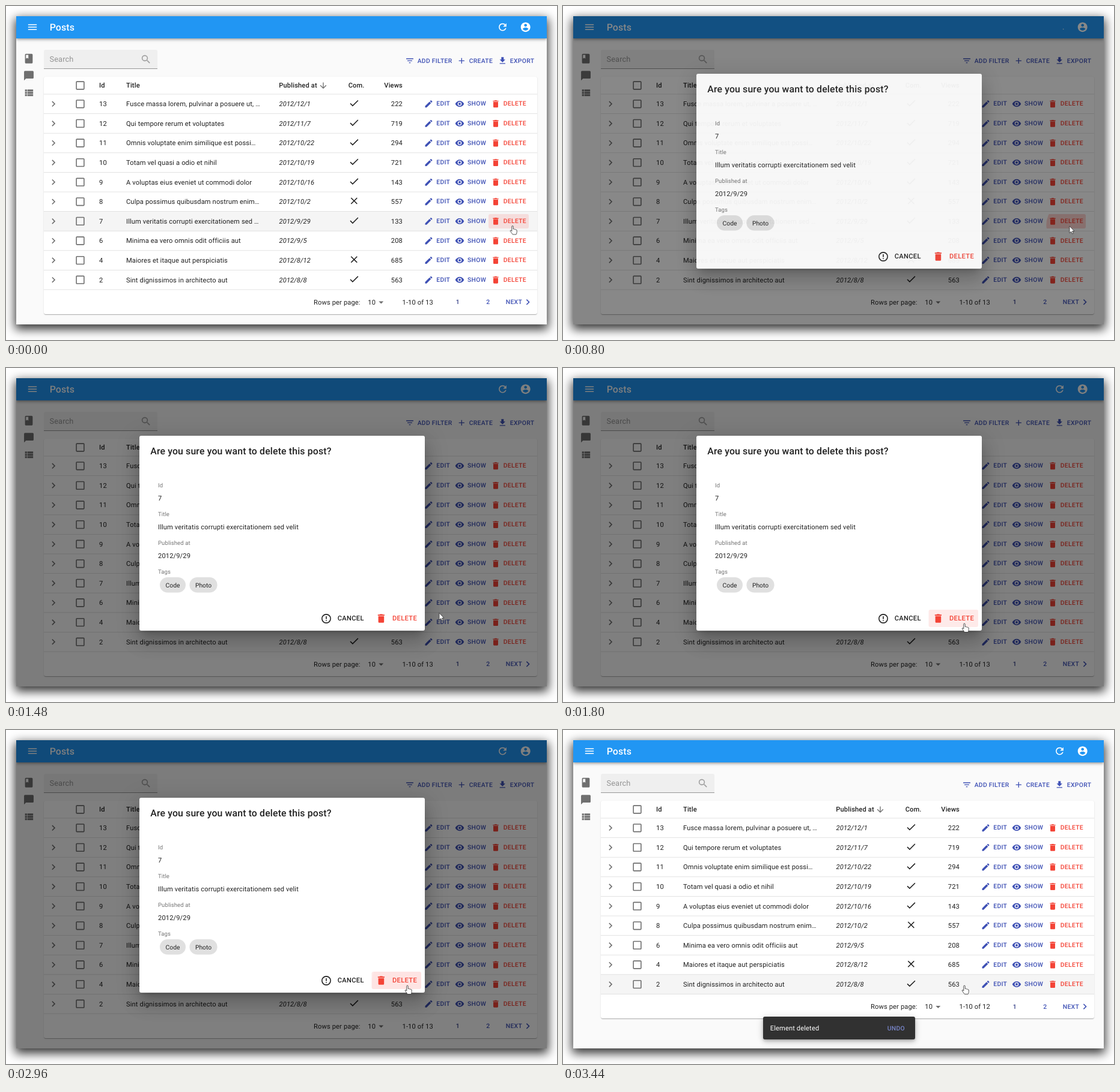
These frames come from a looping animation (917 by 557 pixels, 3.88 s). An HTML page:

```html
<!DOCTYPE html>
<html lang="en">
<head>
<meta charset="utf-8">
<title>Posts</title>
<style>
  html, body { margin: 0; width: 100%; height: 100%; overflow: hidden; background: #fff; }
  #stage { position: relative; width: 917px; height: 557px; overflow: hidden; }
  #stage div, #stage svg { position: absolute; }
  #stage svg, .layer { left: 0; top: 0; width: 917px; height: 557px; }
  .window { left: 17px; top: 17px; width: 883px; height: 514px; background: #fafafa;
    box-shadow: 0 6px 16px 2px rgba(0,0,0,.8); }
  .bar { left: 17px; top: 17px; width: 883px; height: 37px; background: #2196f3;
    box-shadow: 0 1.6px 3.2px -.8px rgba(0,0,0,.2), 0 3.2px 4px rgba(0,0,0,.14), 0 .8px 8px rgba(0,0,0,.12);
    clip-path: inset(0 0 -14px 0); }
  .card { left: 63px; top: 118px; width: 821px; background: #fff; border-radius: 3px;
    box-shadow: 0 1.6px .8px -.8px rgba(0,0,0,.2), 0 .8px .8px rgba(0,0,0,.14), 0 .8px 2.4px rgba(0,0,0,.12); }
  #dim { left: 17px; top: 17px; width: 883px; height: 514px; background: #000; }
  .paper { left: 221.5px; top: 113px; width: 475.5px; height: 324.5px; background: #fff; border-radius: 3px;
    box-shadow: 0 9px 12px -5.6px rgba(0,0,0,.2), 0 19px 30px 2.4px rgba(0,0,0,.14), 0 7px 37px 6.4px rgba(0,0,0,.12); }
  #snack { transform-origin: 459.25px 497px; }
  .toast { left: 332.5px; top: 478px; width: 253.5px; height: 38px; background: #313131; border-radius: 3px;
    box-shadow: 0 2.4px 4px -.8px rgba(0,0,0,.2), 0 4.8px 8px rgba(0,0,0,.14), 0 .8px 14px rgba(0,0,0,.12); }
  text { font: 400 11.15px Roboto, Arial, sans-serif; letter-spacing: .0107em; fill: #212121;
    text-rendering: geometricPrecision; white-space: pre; }
  .head { font-weight: 500; }
  .date { font-style: italic; }
  .num { text-anchor: end; }
  .btn { font-weight: 500; font-size: 10.35px; letter-spacing: .0286em; }
  .big { font-weight: 500; letter-spacing: .0286em; }
  .title { font-weight: 500; font-size: 15.9px; letter-spacing: .0075em; }
  .search { font-size: 12.74px; fill: #949494; }
  .label { font-size: 9.55px; letter-spacing: .0094em; fill: #757575; }
  .chip { font-size: 10.35px; letter-spacing: 0; }
  .blue { fill: #3f51b5; }
  .red { fill: #f44336; }
  .white { fill: #fff; }
  .pale { fill: #7986cb; }
  .page { fill: #333d85; }
</style>
</head>
<body>
<div id="stage"></div>
<script>
const ICONS = {
  menu: 'M3 18h18v-2H3v2zm0-5h18v-2H3v2zm0-7v2h18V6H3z',
  refresh: 'M17.65 6.35C16.2 4.9 14.21 4 12 4c-4.42 0-7.99 3.58-7.99 8s3.57 8 7.99 8c3.73 0 6.84-2.55 7.73-6h-2.08c-.82 2.33-3.04 4-5.65 4-3.31 0-6-2.69-6-6s2.69-6 6-6c1.66 0 3.14.69 4.22 1.78L13 11h7V4z',
  user: 'M12 2C6.48 2 2 6.48 2 12s4.48 10 10 10 10-4.48 10-10S17.52 2 12 2zm0 3c1.66 0 3 1.34 3 3s-1.34 3-3 3-3-1.34-3-3 1.34-3 3-3zm0 14.2c-2.5 0-4.71-1.28-6-3.22.03-1.99 4-3.08 6-3.08 1.99 0 5.97 1.09 6 3.08-1.29 1.94-3.5 3.22-6 3.22z',
  book: 'M18 2H6c-1.1 0-2 .9-2 2v16c0 1.1.9 2 2 2h12c1.1 0 2-.9 2-2V4c0-1.1-.9-2-2-2zM6 4h5v8l-2.5-1.5L6 12z',
  chat: 'M20 2H4c-1.1 0-2 .9-2 2v18l4-4h14c1.1 0 2-.9 2-2V4c0-1.1-.9-2-2-2z',
  list: 'M4 14h4v-4H4zm0 5h4v-4H4zM4 9h4V5H4zm5 5h12v-4H9zm0 5h12v-4H9zM9 5v4h12V5z',
  search: 'M15.5 14h-.79l-.28-.27A6.5 6.5 0 1 0 13.73 14.43l.27.28v.79l5 4.99L20.49 19zm-6 0a4.5 4.5 0 1 1 0-9 4.5 4.5 0 0 1 0 9z',
  filter: 'M10 18h4v-2h-4zM3 6v2h18V6zm3 7h12v-2H6z',
  add: 'M19 13h-6v6h-2v-6H5v-2h6V5h2v6h6z',
  save: 'M19 9h-4V3H9v6H5l7 7zM5 18v2h14v-2z',
  edit: 'M3 17.25V21h3.75L17.81 9.94l-3.75-3.75zM20.71 7.04a1 1 0 0 0 0-1.41l-2.34-2.34a1 1 0 0 0-1.41 0l-1.83 1.83 3.75 3.75z',
  eye: 'M12 4.5C7 4.5 2.73 7.61 1 12c1.73 4.39 6 7.5 11 7.5s9.27-3.11 11-7.5c-1.73-4.39-6-7.5-11-7.5zM12 17a5 5 0 1 1 0-10 5 5 0 0 1 0 10zm0-8a3 3 0 1 0 0 6 3 3 0 0 0 0-6z',
  bin: 'M6 19c0 1.1.9 2 2 2h8c1.1 0 2-.9 2-2V7H6zM19 4h-3.5l-1-1h-5l-1 1H5v2h14z',
  alert: 'M11 15h2v2h-2zm0-8h2v6h-2zM12 2a10 10 0 1 0 0 20 10 10 0 0 0 0-20zm0 18a8 8 0 1 1 0-16 8 8 0 0 1 0 16z',
  check: 'M9 16.17L4.83 12l-1.42 1.41L9 19 21 7l-1.41-1.41z',
  cross: 'M19 6.41L17.59 5 12 10.59 6.41 5 5 6.41 10.59 12 5 17.59 6.41 19 12 13.41 17.59 19 19 17.59 13.41 12z',
  box: 'M19 5v14H5V5h14m0-2H5c-1.1 0-2 .9-2 2v14c0 1.1.9 2 2 2h14c1.1 0 2-.9 2-2V5c0-1.1-.9-2-2-2z',
  next: 'M10 6L8.59 7.41 13.17 12l-4.58 4.59L10 18l6-6z',
  sort: 'M20 12l-1.41-1.41L13 16.17V4h-2v12.17l-5.58-5.59L4 12l8 8z',
  drop: 'M7 10l5 5 5-5z'
};
const BIG = .796, SMALL = .663, GREY = '#6f6f6f', INK = '#212121', BLUE = '#3f51b5', RED = '#f44336';
const TOP = 147, ROW = 32.6;

// id, title, date, commentable, views
const POSTS = [
  [13, 'Fusce massa lorem, pulvinar a posuere ut, …', '2012/12/1', 'check', 222],
  [12, 'Qui tempore rerum et voluptates', '2012/11/7', 'check', 719],
  [11, 'Omnis voluptate enim similique est possi…', '2012/10/22', 'check', 294],
  [10, 'Totam vel quasi a odio et nihil', '2012/10/19', 'check', 721],
  [9, 'A voluptas eius eveniet ut commodi dolor', '2012/10/16', 'check', 143],
  [8, 'Culpa possimus quibusdam nostrum enim…', '2012/10/2', 'cross', 557],
  [7, 'Illum veritatis corrupti exercitationem sed …', '2012/9/29', 'check', 133],
  [6, 'Minima ea vero omnis odit officiis aut', '2012/9/5', '', 208],
  [4, 'Maiores et itaque aut perspiciatis', '2012/8/12', 'cross', 685],
  [2, 'Sint dignissimos in architecto aut', '2012/8/8', 'check', 563]
];

const text = (x, y, s, cls = '') => `<text x="${x}" y="${y}" class="${cls}">${s}</text>`;
const icon = (name, x, y, fill = INK, k = BIG, id = '') =>
  `<path ${id && `id="${id}"`} d="${ICONS[name]}" fill="${fill}" transform="translate(${x} ${y}) scale(${k}) translate(-12 -12)"/>`;
const rect = (x, y, w, h, fill, more = '') =>
  `<rect x="${x}" y="${y}" width="${w}" height="${h}" fill="${fill}" ${more}/>`;
const svg = (body, id = '') => `<svg ${id && `id="${id}"`} viewBox="0 0 917 557">${body}</svg>`;

function row([id, title, date, com, views], i) {
  const c = TOP + ROW * (i + .5), b = c + 3.9, a = c + 3;
  return icon('next', 79, c, GREY) + icon('box', 123.5, c, GREY) +
    text(155, b, id) + text(200, b, title) + text(454.5, b, date, 'date') +
    (com && icon(com, 579.3, c - 1.3)) + text(660, b, views, 'num') +
    icon('edit', 703.5, c, BLUE, SMALL) + text(716.3, a, 'EDIT', 'btn blue') +
    icon('eye', 755, c, BLUE, SMALL) + text(768, a, 'SHOW', 'btn blue') +
    icon('bin', 815, c, RED, SMALL) + text(827.8, a, 'DELETE', 'btn red') +
    rect(63, TOP + ROW * (i + 1) - .4, 821, .8, '#dcdcdc');
}

function table(id, posts, hover, total) {
  const end = TOP + ROW * posts.length, c = end + 20.8, b = c + 3.9;
  return `<div class="layer" id="${id}"><div class="card" style="height:${end + 41 - 118}px"></div>` + svg(
    `<g class="hover">${rect(63, TOP + ROW * hover, 821, ROW, '#f5f5f5')}` +
    (id === 'before' ? rect(803, 347, 67, 24, 'rgba(244,67,54,.13)', 'rx="3"') : '') + '</g>' +
    icon('box', 123.5, 132.5, GREY) + text(155, 136.3, 'Id', 'head') + text(200, 136.3, 'Title', 'head') +
    text(454.3, 136.3, 'Published at', 'head') + icon('sort', 528, 132.7, GREY, SMALL) +
    text(569.7, 136.3, 'Com.', 'head') + text(660, 136.3, 'Views', 'head num') +
    rect(63, TOP - .4, 821, .8, '#dcdcdc') + posts.map(row).join('') +
    text(512, b, 'Rows per page:') + text(602.3, b, '10') + icon('drop', 624.3, c + .3, GREY) +
    text(659.5, b, '1-10 of ' + total) + text(748.8, b - .3, '1', 'btn page') +
    text(799.2, b - .3, '2', 'btn blue') + text(831.8, b - .3, 'NEXT', 'btn blue') + icon('next', 868.5, c, BLUE)
  ) + '</div>';
}

const field = (y, label, value) => text(253, y, label, 'label') + text(253, y + 21.4, value);
const chip = (x, w, s) => rect(x, 349, w, 25.6, '#e0e0e0', 'rx="12.8"') + text(x + 9.5, 365.8, s, 'chip');

const dialog = '<div class="layer" id="dialog"><div class="paper"></div>' + svg(
  text(240.2, 144, 'Are you sure you want to delete this post?', 'title') +
  field(199.2, 'Id', '7') +
  field(247.3, 'Title', 'Illum veritatis corrupti exercitationem sed velit') +
  field(295.3, 'Published at', '2012/9/29') +
  text(253, 343.3, 'Tags', 'label') + chip(256, 43, 'Code') + chip(305.4, 46.2, 'Photo') +
  rect(608.5, 403, 82.5, 29, 'rgba(244,67,54,.11)', 'rx="3" id="hot"') +
  '<g clip-path="url(#btn2)"><circle id="ripple2" fill="#f44336"/></g>' +
  icon('alert', 533, 418) + text(551.7, 421.4, 'CANCEL', 'big') +
  icon('bin', 624.4, 417.7, RED) + text(643, 421.4, 'DELETE', 'big red')
) + '</div>';

document.getElementById('stage').innerHTML =
  '<div class="window"></div>' +
  table('before', POSTS, 6, 13) +
  table('after', POSTS.filter(p => p[0] !== 7), 8, 12) +
  '<div class="bar"></div>' +
  svg(
    '<clipPath id="btn1"><rect x="803" y="347" width="67" height="24" rx="3"/></clipPath>' +
    '<clipPath id="btn2"><rect x="608.5" y="403" width="82.5" height="29" rx="3"/></clipPath>' +
    icon('menu', 44, 35.2, '#fff') + text(72.7, 40.7, 'Posts', 'title white') +
    icon('refresh', 826.5, 35.2, '#fff', BIG, 'refresh') + icon('user', 864.7, 35.2, '#fff') +
    '<circle id="spin" cx="826.5" cy="35.2" r="7" fill="none" stroke="#fff" stroke-width="1.6"/>' +
    icon('book', 38, 87.8, GREY) + icon('chat', 38, 116.3, GREY) + icon('list', 38, 144.8, GREY) +
    '<path d="M63 104V76q0-3 3-3H249q3 0 3 3V104Z" fill="rgba(0,0,0,.045)"/>' +
    rect(63, 104, 189, .9, '#8c8c8c') + text(72.5, 93.3, 'Search', 'search') + icon('search', 233, 89, '#a0a0a0') +
    icon('filter', 672, 91.3, BLUE, SMALL) + text(684.7, 94.8, 'ADD FILTER', 'btn blue') +
    icon('add', 758.3, 91.3, BLUE, SMALL) + text(770.8, 94.8, 'CREATE', 'btn blue') +
    icon('save', 826.3, 91.3, BLUE, SMALL) + text(838.8, 94.8, 'EXPORT', 'btn blue') +
    '<g clip-path="url(#btn1)"><circle id="ripple1" fill="#f44336"/></g>'
  ) +
  '<div id="dim"></div>' + dialog +
  '<div class="layer" id="snack"><div class="toast"></div>' +
  svg(text(344.7, 501, 'Element deleted', 'white') + text(539.7, 500.6, 'UNDO', 'btn pale')) + '</div>' +
  svg('<circle id="click" r="9" fill="#f4ea2a" opacity=".75"/><g id="cursor" fill="#fff" stroke="#2b2b2b" stroke-width=".8" stroke-linejoin="round">' +
    '<path id="arrow" d="M0 0V11.5L2.7 9.2 4.6 13 6.4 12.2 4.6 8.5H8Z"/>' +
    '<path id="hand" d="M-1.2 8.5V.8a1.2 1.2 0 0 1 2.4 0V5q1.6-.6 2.2.5 1.5-.4 2 .6 1.8-.2 1.8 1.4V10q0 2-1.2 4H.3Q-1.2 12-3.6 8.6q-.6-1.4.6-1.6.9 0 1.8 1.5Z"/></g>');

const $ = id => document.getElementById(id);
const show = (el, on) => { el.style.display = on ? '' : 'none'; };
const ramp = (t, a, b) => Math.min(1, Math.max(0, (t - a) / (b - a)));

// cubic-bezier(.4, 0, .2, 1)
function ease(x) {
  let lo = 0, hi = 1, s = x;
  for (let i = 0; i < 24; i++) {
    s = (lo + hi) / 2;
    const v = 1 - s;
    if (1.2 * v * v * s + .6 * v * s * s + s ** 3 < x) lo = s; else hi = s;
  }
  return 3 * (1 - s) * s * s + s ** 3;
}

// The picture refreshes only at these moments.
const LOOP = 3880;
const ticks = [0, 560, 640, 680, 800, 880, 960, 1040, 1080];
for (let t = 1160; t <= 1800; t += 80) ticks.push(t);
for (let t = 2480; t <= 3280; t += 80) ticks.push(t);

const HOME = [843, 367], GOAL = [668, 426.5], CLICKS = [560, 2480];

function ripple(el, dt, [x, y], reach) {
  const on = dt >= 0 && dt < 520;
  show(el, on);
  if (!on) return;
  el.setAttribute('cx', x);
  el.setAttribute('cy', y - 2);
  el.setAttribute('r', 8 + reach * ease(ramp(dt, 0, 550)));
  el.setAttribute('opacity', .28 * ramp(dt, 0, 100) * (1 - ramp(dt, 200, 520)));
}

function draw(now) {
  const t = ticks.filter(k => k <= now).pop();
  const done = t >= 3040;

  show($('before'), !done);
  show($('after'), done);
  show(document.querySelector('#before .hover'), t < 800);

  const fade = done ? 0 : ease(ramp(t, 645, 870));
  $('dim').style.opacity = fade / 2;
  $('dialog').style.opacity = fade;
  $('hot').setAttribute('opacity', ramp(t, 1600, 1800));

  const busy = t >= 800 && t < 1080;
  show($('refresh'), !busy);
  show($('spin'), busy);
  $('spin').setAttribute('stroke-dasharray', `${1 + (t - 800) * .05} 60`);
  $('spin').setAttribute('transform', `rotate(${25 + (t - 800) * .25} 826.5 35.2)`);

  ripple($('ripple1'), t - CLICKS[0], HOME, 45);
  ripple($('ripple2'), t - CLICKS[1], GOAL, 52);

  const move = ramp(t, 1100, 1680);
  const p = move + .6 * move * (1 - move) * (2 * move - 1);
  const at = HOME.map((v, i) => v + (GOAL[i] - v) * p);
  $('cursor').setAttribute('transform', `translate(${at})`);
  const hand = t < 680 || at[0] < 691;
  show($('hand'), hand);
  show($('arrow'), !hand);
  show($('click'), CLICKS.some(c => t >= c && t < c + 120));
  $('click').setAttribute('transform', `translate(${at[0] + .5} ${at[1] + 1.5})`);

  const k = .75 + .25 * ease(ramp(t, 3005, 3155));
  $('snack').style.opacity = ease(ramp(t, 3005, 3230));
  $('snack').style.transform = `scale(${k}, ${k * k})`;
}

const start = performance.now();
function loop() {
  draw((performance.now() - start) % LOOP);
  requestAnimationFrame(loop);
}
loop();
</script>
</body>
</html>
```
